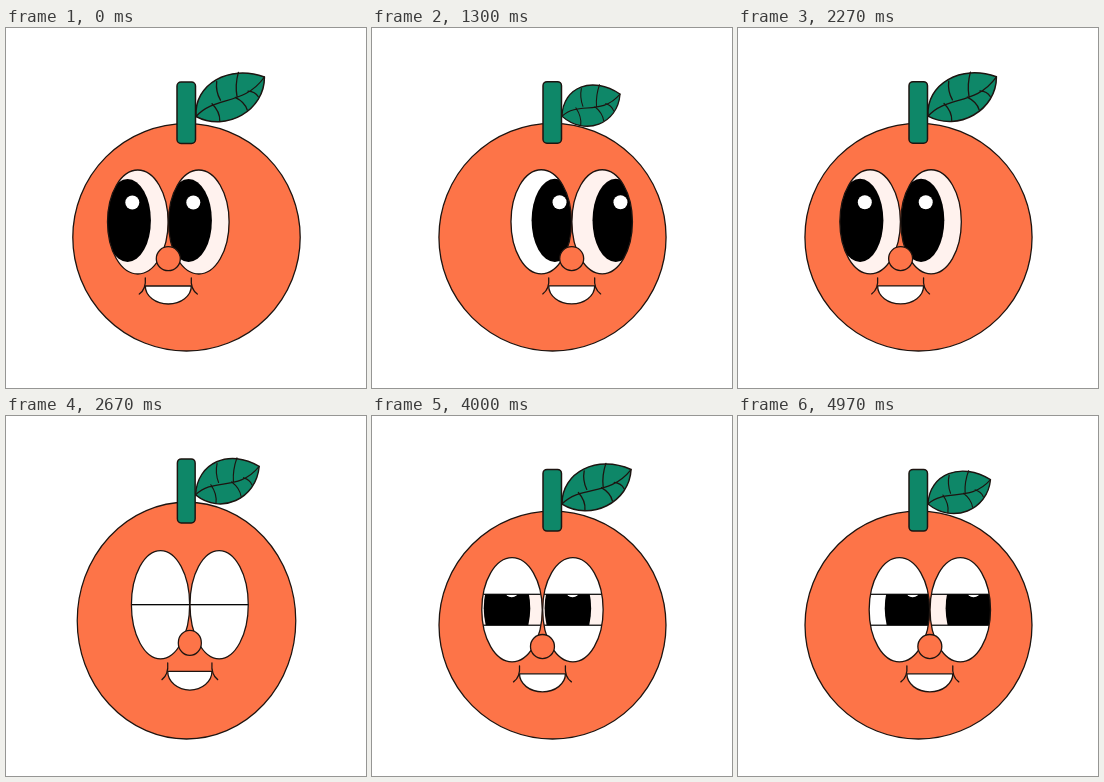
An HTML page that plays this animation: 360 px wide and 360 px high, repeating every 5000 ms.

```html
<!DOCTYPE html>
<html lang="en">
<head>
<meta charset="utf-8">
<title>Orange</title>
<style>
  html, body { margin: 0; width: 100%; height: 100%; overflow: hidden; background: #fff; }
  svg { display: block; width: 100%; height: 100%; }
  .line { fill: none; }
  .line, .skin, .green { stroke: #1d1410; stroke-width: 1.3; stroke-linecap: round; stroke-linejoin: round; }
  .skin { fill: #fd7448; }
  .green { fill: #0e8768; stroke-width: 1.5; }
  .lid { fill: #fff; stroke: #000; stroke-width: 1.2; }
</style>
</head>
<body>
<svg viewBox="0 0 360 360">
  <defs>
    <clipPath id="eyeShape"><ellipse rx="30.3" ry="52"/></clipPath>
    <g id="pupil">
      <ellipse cx="-4.7" cy="-1.5" rx="23.3" ry="41.5"/>
      <circle cy="-19.5" r="7" fill="#fff"/>
    </g>
    <path id="cheek" class="line" d="M23-8Q22 3 29 8"/>
  </defs>
  <g id="fruit">
    <circle class="skin" cx="180.5" cy="209.3" r="113.7"/>
    <g id="leaf">
      <path class="green" d="M0 0C14-29 54-29 78 0C62 29 18 29 0 0Z"/>
      <path class="line" stroke-width="1.5" d="M0 0C26-9 46 15 78 0M29-2Q29-12 35-20M45 3Q49-8 58-17M20-3Q23 8 18 16M43 3Q49 12 47 20M57 4Q63 8 63 14"/>
    </g>
    <rect class="green" x="171" y="54" width="18.5" height="61.5" rx="4"/>
    <g id="face">
      <g class="eye" transform="translate(-30.5 194)"></g>
      <g class="eye" transform="translate(30.5 194)"></g>
      <circle class="skin" cy="230.7" r="12"/>
      <g transform="translate(0 258)">
        <path class="line" style="fill:#fff" d="M-23 0H23A23 18 0 0 1-23 0Z"/>
        <use href="#cheek"/>
        <use href="#cheek" transform="scale(-1 1)"/>
      </g>
    </g>
  </g>
</svg>
<script>
  const LOOP = 5000, CYCLE = 55, TURN_BACK = 31, MOVE = 23, GROUND = 323;
  const $ = id => document.getElementById(id);

  const eyes = [...document.querySelectorAll('.eye')].map(eye => {
    eye.innerHTML = `
      <g clip-path="url(#eyeShape)">
        <ellipse class="white" rx="30.3" ry="52" fill="#fff2ee"/>
        <use class="look" href="#pupil"/>
        <rect class="lid" x="-40" width="80" height="70"/>
        <rect class="lid" x="-40" width="80" height="70"/>
      </g>
      <ellipse class="line" rx="30.3" ry="52"/>`;
    return {
      white: eye.querySelector('.white'),
      look: eye.querySelector('.look'),
      lids: eye.querySelectorAll('.lid')
    };
  });

  const ease = x => {
    const u = Math.min(1, Math.max(0, x));
    return u * u * (3 - 2 * u);
  };
  const mix = (a, b, u) => a + (b - a) * u;

  // Rows of [step, value], eased between neighbours.
  function track(keys, step) {
    const i = keys.findIndex(key => key[0] >= step);
    if (i <= 0) return keys[0][1];
    const [s0, v0] = keys[i - 1], [s1, v1] = keys[i];
    return mix(v0, v1, ease((step - s0) / (s1 - s0)));
  }

  const STRETCH = [[0, 0], [10, .045], [17, -.026], [23, 0]];
  const OPEN = [[0, 1], [2.5, 1], [11, 0], [19.5, 1], [23, 1]];

  function draw(time) {
    // 25 poses a second shown on a 30 Hz clock
    const tick = Math.min(149, Math.floor((time % LOOP + 4) * .03));
    const phase = Math.floor(tick * 5 / 6) % CYCLE;
    const goingRight = phase < TURN_BACK;
    const step = Math.min(MOVE, goingRight ? phase : phase - TURN_BACK);
    const moved = ease(step / 20);
    const side = goingRight ? moved : 1 - moved;

    const stretch = track(STRETCH, step);
    $('fruit').setAttribute('transform',
      `translate(180.5 ${GROUND}) scale(${1 - stretch * .95} ${1 + stretch}) translate(-180.5 ${-GROUND})`);

    $('face').setAttribute('transform', `translate(${mix(162.3, 200, side)} 0)`);

    const angle = 20.8 + 9.2 * (1 - side) ** 2;
    const length = 79 - 17 * side ** 1.5;
    $('leaf').setAttribute('transform',
      `translate(190 88.5) rotate(${-angle}) scale(${length / 78} ${1 - .06 * side})`);

    const gap = 54 * track(OPEN, step);
    eyes.forEach(({ white, look, lids }, i) => {
      white.setAttribute('fill', i === 0 && side > .5 ? '#fff' : '#fff2ee');
      look.setAttribute('x', mix(-5.5, 18.5, side));
      lids[0].setAttribute('y', -gap - 70);
      lids[1].setAttribute('y', gap);
    });
  }

  const start = performance.now();
  function tickOn() {
    draw(performance.now() - start);
    requestAnimationFrame(tickOn);
  }
  draw(0);
  requestAnimationFrame(tickOn);
</script>
</body>
</html>
```
